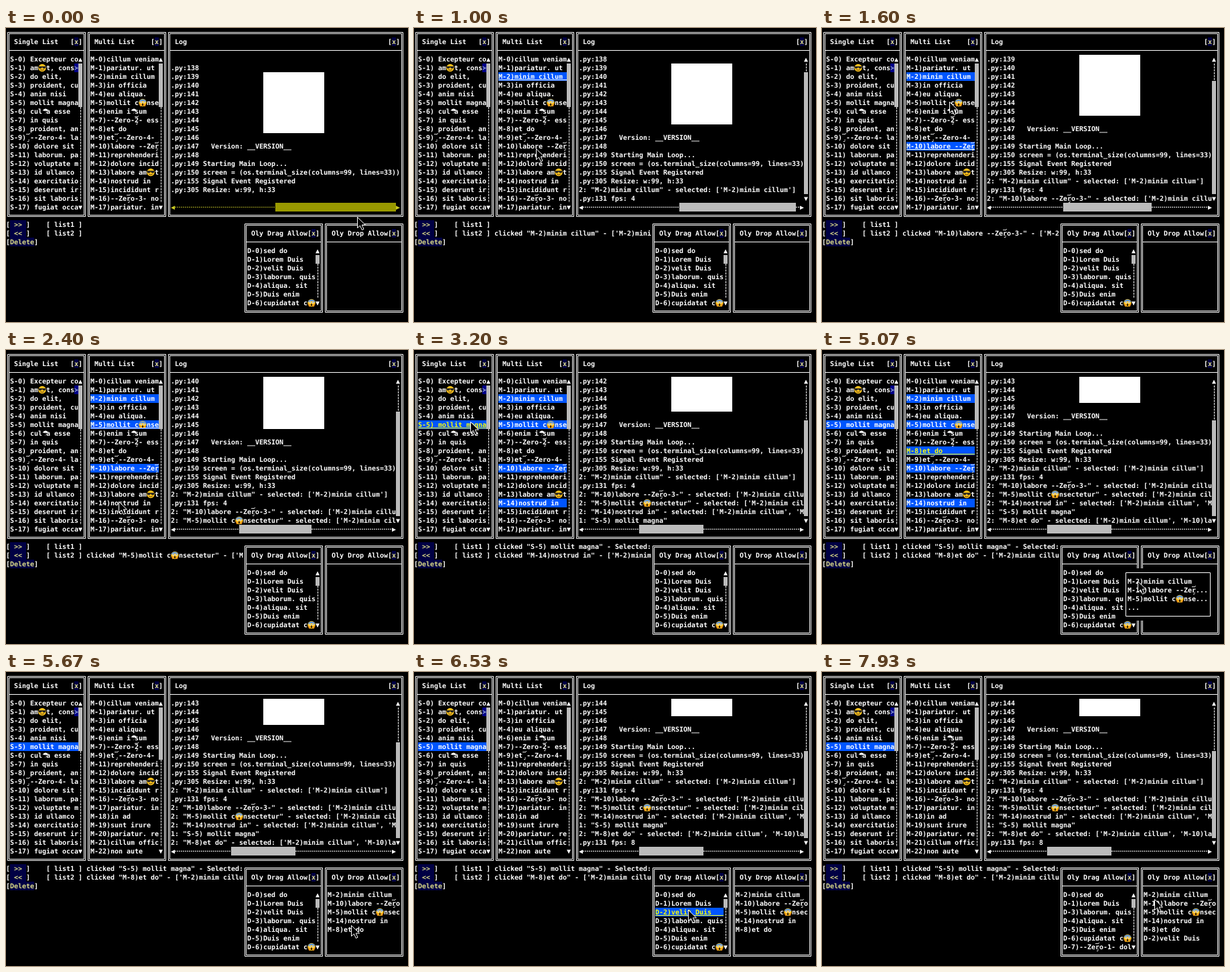
These frames come from a looping animation (600 by 439 pixels, 8000 ms). An HTML page:

```html
<!DOCTYPE html>
<html lang="en">
<head>
<meta charset="utf-8">
<title>Terminal lists</title>
<style>
html, body { margin: 0; width: 100%; height: 100%; overflow: hidden; background: #000; }
svg { display: block; }
text { font: bold 10px "DejaVu Sans Mono", monospace; letter-spacing: -.0205px; white-space: pre; text-rendering: geometricPrecision; }
text.sym { font: bold 11px "DejaVu Sans", sans-serif; }
</style>
</head>
<body>
<svg width="600" height="439" viewBox="0 0 600 439">
  <defs>
    <g id="cool">
      <circle cx="6" cy="6.5" r="5.7" fill="#fcc21b"/>
      <path d="M.5 4.3h11l-.6 2.4q-2.2 1.8-4 0L6 5.4l-.9 1.3q-2 1.8-4 0z" fill="#222"/>
      <path d="M3.2 9.3q3 2 5.6-.2" fill="none" stroke="#5a3a10"/>
    </g>
    <g id="scream">
      <circle cx="6" cy="6.5" r="5.7" fill="#fcc21b"/>
      <path d="M.5 5.6a5.7 5.7 0 0 1 11 0q-5.5-3-11 0z" fill="#5a93d8"/>
      <circle cx="3.9" cy="5.7" r="1.5" fill="#fff"/><circle cx="8.1" cy="5.7" r="1.5" fill="#fff"/>
      <circle cx="3.9" cy="5.7" r=".6" fill="#222"/><circle cx="8.1" cy="5.7" r=".6" fill="#222"/>
      <ellipse cx="6" cy="9.6" rx="1.3" ry="2" fill="#40240c"/>
      <path d="M1.7 8l1.4 4M10.3 8l-1.4 4" stroke="#e88b1c" stroke-width="1.8"/>
    </g>
    <path id="mark" d="M0 1.6h4.5M6 0l-2 2M4.5 9.5l-1 1.5M2 12.5q2.5.5 2.5-1" fill="none" stroke="#fff" stroke-width=".9"/>
    <clipPath id="logView"><rect x="246" y="40" width="336" height="221"/></clipPath>
  </defs>
  <g id="screen"></g>
  <path id="mouse" d="M0 0V16L4 12.6 6.8 19 9.5 17.8 6.8 11.6H12Z" fill="#000" stroke="#fff"/>
</svg>
<script>
const CW = 6, RH = 13, STEP = 200 / 3, STEPS = 120;
const WHITE = '#fff', GREY = '#bbb', BLUE = '#0055ff', YELLOW = '#ffff00';
const screen = document.getElementById('screen');
const mouse = document.getElementById('mouse');

const X = c => c * CW, Y = r => 1 + r * RH;
const esc = s => s.replace(/&/g, '&amp;').replace(/</g, '&lt;');
const rect = (c, r, w, h, fill) =>
  `<rect x="${X(c)}" y="${Y(r)}" width="${w * CW}" height="${h * RH}" fill="${fill}"/>`;
const line = (x, y, d, color, dash = '') =>
  `<path d="M${x} ${y}${d}" fill="none" stroke="${color}" stroke-dasharray="${dash}"/>`;
const raw = (s, c, r, fill = WHITE, cls = '') =>
  `<text x="${X(c)}" y="${Y(r) + 10}" fill="${fill}" class="${cls}">${esc(s)}</text>`;
const icon = (id, c, r) => `<use href="#${id}" x="${X(c)}" y="${Y(r)}"/>`;

// Writes a string cell by cell: emoji take two cells, ^ is a zero-width accent
function put(str, col, row, max = 99, fill = WHITE) {
  let out = '', run = '', start = col, c = col;
  const flush = () => { if (run.trim()) out += raw(run, start, row, fill); run = ''; };
  for (const ch of str) {
    if (ch === '^') { out += icon('mark', c - 1, row); continue; }
    const wide = ch.length > 1, left = col + max - c;
    if (left <= 0) break;
    if (wide && left < 2) {
      flush();
      out += rect(c, row, 1, 1, '#000088') + raw('≻', c, row, '#8899cc');
      break;
    }
    if (wide || ch === '☂') {
      flush();
      out += wide ? icon(ch === '😎' ? 'cool' : 'scream', c, row) : raw(ch, c, row, fill, 'sym');
      c += wide ? 2 : 1;
      start = c;
    } else {
      if (!run) start = c;
      run += ch;
      c++;
    }
  }
  flush();
  return out;
}

const button = (s, c, r) => raw('[', c, r) + rect(c + 1, r, s.length, 1, '#000044') +
  raw(s, c + 1, r, '#dddd88') + raw(']', c + 1 + s.length, r);

function win(title, c0, r0, c1, r1) {
  const frame = (a, b) =>
    line(X(c0) + a, Y(r0) + a + 3, `H${X(c1) + b}V${Y(r1) + b + 3}H${X(c0) + a}Z`, WHITE);
  return rect(c0, r0, c1 - c0 + 1, r1 - r0 + 1, '#000') + frame(2.5, 4.5) + frame(4.5, 2.5) +
    line(X(c0) + 4.5, Y(r0 + 2) + 6.5, `H${X(c1) + 2.5}`, WHITE) +
    raw(title, c0 + 2, r0 + 1) + button('x', c1 - 3, r0 + 1);
}

const vbar = (c, r0, r1, s, n) => raw('▲', c, r0) + raw('▼', c, r1) +
  line(X(c) + 3.5, Y(r0 + 1), `V${Y(r1)}`, WHITE, '3 1.33') + rect(c, s, 1, n, GREY);

const hbar = (r, c0, c1, s, n, hot) => raw('◀', c0, r, hot ? '#cccc22' : WHITE) +
  raw('▶', c1, r, hot ? '#cccc22' : WHITE) +
  line(X(c0 + 1), Y(r) + 6.5, `H${X(c1)}`, hot ? '#aaaa22' : WHITE, '2 1') +
  rect(s, r, n, 1, hot ? '#999900' : GREY);

const build = (key, gap, words) => words.split('|').map((w, i) => `${key}-${i})${gap}${w}`);
const lists = {
  S: build('S', ' ', 'Excepteur co|am😎t, cons😱|do elit,|proident, cu|anim nisi|mollit magna|cul☂a esse|in quis|' +
    'proident, an|^--Zero-4- la|dolore sit|laborum. pa|voluptate m|id ullamco|exercitatio|deserunt ir|sit laboris|fugiat occa'),
  M: build('M', '', 'cillum veniam|pariatur. ut|minim cillum|in officia|eu aliqua.|mollit c😱nsectetur|enim i☂sum|' +
    '--Zero-2^- ess|et do|et ^--Zero-4-|labore --Zer^o-3-|reprehenderi|dolore incid|labore am😎t|nostrud in|' +
    'incididunt r|--Zer^o-3- no|pariatur. in|in ad|sunt irure|pariatur. re|cillum offic|non aute'),
  D: build('D', '', 'sed do|Lorem Duis|velit Duis|laborum. quis|aliqua. sit|Duis enim|cupidatat c😱|--Zer^o-1- dol')
};
const header = ['', ...[138, 139, 140, 141, 142, 143, 144, 145, 146].map(n => '.py:' + n),
  '.py:147   Version: __VERSION__', '.py:148', '.py:149 Starting Main Loop...',
  '.py:150 screen = (os.terminal_size(columns=99, lines=33))',
  '.py:155 Signal Event Registered', '.py:305 Resize: w:99, h:33'];

// Times below count steps of 1/15 s
const clicks = [[9, 'M', 2], [12, 'fps', 4], [18, 'M', 10], [28, 'M', 5], [37, 'M', 14],
  [48, 'S', 5], [64, 'M', 8], [98, 'fps', 8], [98, 'D', 2]];
const DRAG1 = 69, DROP1 = 85, DRAG2 = 99, DROP2 = 109;
const sliders = [[67, 30], [66, 29], [60, 22], [58, 18], [56, 16]];
const track = [[1, 524, 282], [9, 170, 72], [11, 170, 72], [13, 182, 131], [15, 182, 180], [19, 182, 180],
  [24, 190, 110], [30, 190, 110], [36, 168, 226], [38, 168, 226], [40, 106, 136], [45, 84, 107],
  [49, 84, 107], [56, 170, 146], [59, 170, 146], [61, 172, 147], [68, 172, 147], [76, 471, 345],
  [80, 515, 378], [87, 515, 378], [92, 405, 354], [93, 405, 354], [94, 409, 355], [98, 409, 355],
  [102, 519, 406], [111, 519, 406], [113, 526, 420], [116, 455, 390], [119, 496, 339]];

function pointer(n) {
  const i = track.findIndex(k => k[0] >= n);
  if (i < 1) return track[0].slice(1);
  const [a, x0, y0] = track[i - 1], [b, x1, y1] = track[i];
  const u = (n - a) / (b - a), e = u * u * (3 - 2 * u);
  return [Math.round(x0 + (x1 - x0) * e), Math.round(y0 + (y1 - y0) * e)];
}

function replay(n) {
  const st = { log: header.slice(), picked: [], single: '', current: '', label1: '', label2: '' };
  for (const [at, key, i] of clicks) {
    if (at > n) break;
    if (key === 'fps') { st.log.push('.py:131 fps: ' + i); continue; }
    const item = st.current = lists[key][i];
    if (key === 'S') {
      st.single = item;
      st.log.push(`1: "${item}"`);
      st.label1 = `clicked "${item}" - Selected: `;
    } else if (key === 'M') {
      st.picked.push(item);
      const all = `[${st.picked.map(s => `'${s}'`).join(', ')}]`;
      st.log.push(`2: "${item}" - selected: ${all}`);
      st.label2 = `clicked "${item}" - ${all}`;
    }
  }
  return st;
}

function drawList(items, c, r, rows, w, chosen, current, row, held) {
  return items.slice(0, rows).map((s, i) => {
    const on = chosen.includes(s), cur = on && s === current;
    const fill = cur && (held || row === r + i) ? YELLOW : WHITE;
    return (on ? rect(c, r + i, w, 1, BLUE) : '') + put(s, c, r + i, w, fill) +
      (cur ? `<rect x="${X(c)}" y="${Y(r + i) + 11}" width="${w * CW}" height="1" fill="${fill}"/>` : '');
  }).join('');
}

function drawLog(st, hot) {
  const n = st.log.length, top = Math.max(0, n - 17), scroll = n > 17;
  let out = win('Log', 40, 0, 98, 21);
  out += st.log.slice(top).map((s, i) => put(s, 41, 3 + i, scroll ? 56 : 57)).join('');
  out += `<g clip-path="url(#logView)"><rect x="384" y="${Y(5 - top)}" width="91" height="91" fill="#fff"/></g>`;
  if (scroll) {
    const size = Math.floor(15 * 17 / n);
    out += vbar(97, 3, 19, 19 - size, size);
  }
  const [s, len] = sliders[Math.min(4, st.picked.length)];
  return out + hbar(20, 41, scroll ? 96 : 97, s, len, hot);
}

function popup(lines, w, x, y) {
  const c = Math.floor(x / CW) - 3, r = Math.floor((y - 1) / RH) - 1, h = lines.length + 2;
  return rect(c, r, w, h, '#000') +
    line(X(c) + 3.5, Y(r) + 6.5, `h${(w - 1) * CW}v${(h - 1) * RH}h${(1 - w) * CW}z`, WHITE) +
    lines.map((s, i) => put(s, c + 1, r + 1 + i)).join('');
}

function draw(n) {
  const [x, y] = pointer(n), row = Math.floor((y - 1) / RH), st = replay(n);
  const moved = n >= DROP1, moved2 = n >= DROP2, dItem = lists.D[2];
  const drag1 = n >= DRAG1 && !moved, drag2 = n >= DRAG2 && !moved2;
  const multi = lists.M.filter(s => !moved || !st.picked.includes(s));
  const dragList = lists.D.filter(s => !moved2 || s !== dItem);
  const dropped = [...(moved ? st.picked : []), ...(moved2 ? [dItem] : [])];

  let out = win('Single List', 0, 0, 19, 21) +
    drawList(lists.S, 1, 3, 18, 17, [st.single], st.current, row, false) + vbar(18, 3, 20, 4, 5);
  out += win('Multi List', 20, 0, 39, 21) +
    drawList(multi, 21, 3, 18, 17, st.picked, st.current, row, drag1) + vbar(38, 3, 20, 4, moved ? 6 : 5);
  out += drawLog(st, n < 1);
  out += button(' >> ', 0, 22) + button(' << ', 0, 23) + button('Delete', 0, 24);
  out += raw('[ list1 ]', 10, 22) + raw('[ list2 ]', 10, 23);
  out += put(st.label1, 20, 22, 39) + put(st.label2, 20, 23, 39);
  out += win('Oly Drag Allow', 59, 22, 78, 32) +
    drawList(dragList, 60, 25, 7, 17, n >= 98 ? [dItem] : [], st.current, row, drag2) + vbar(77, 25, 31, 26, 1);
  out += win('Oly Drop Allow', 79, 22, 98, 32) +
    drawList(dropped, 80, 25, 7, 18, [], '', row, false);
  if (drag1) {
    out += popup(['M-2)minim cillum', 'M-10)labore --Zer^...', 'M-5)mollit c😱nse...', '...'], 22, x, y);
  }
  if (drag2) out += popup([dItem], dItem.length + 2, x, y);
  screen.innerHTML = out;
  mouse.setAttribute('transform', `translate(${x + .5} ${y + .5})`);
}

let last = -1;
const begin = performance.now();
function tick() {
  const t = (performance.now() - begin) % (STEP * STEPS);
  const n = Math.floor((t + 4) / STEP) % STEPS;
  if (n !== last) draw(last = n);
  requestAnimationFrame(tick);
}
tick();
</script>
</body>
</html>
```
